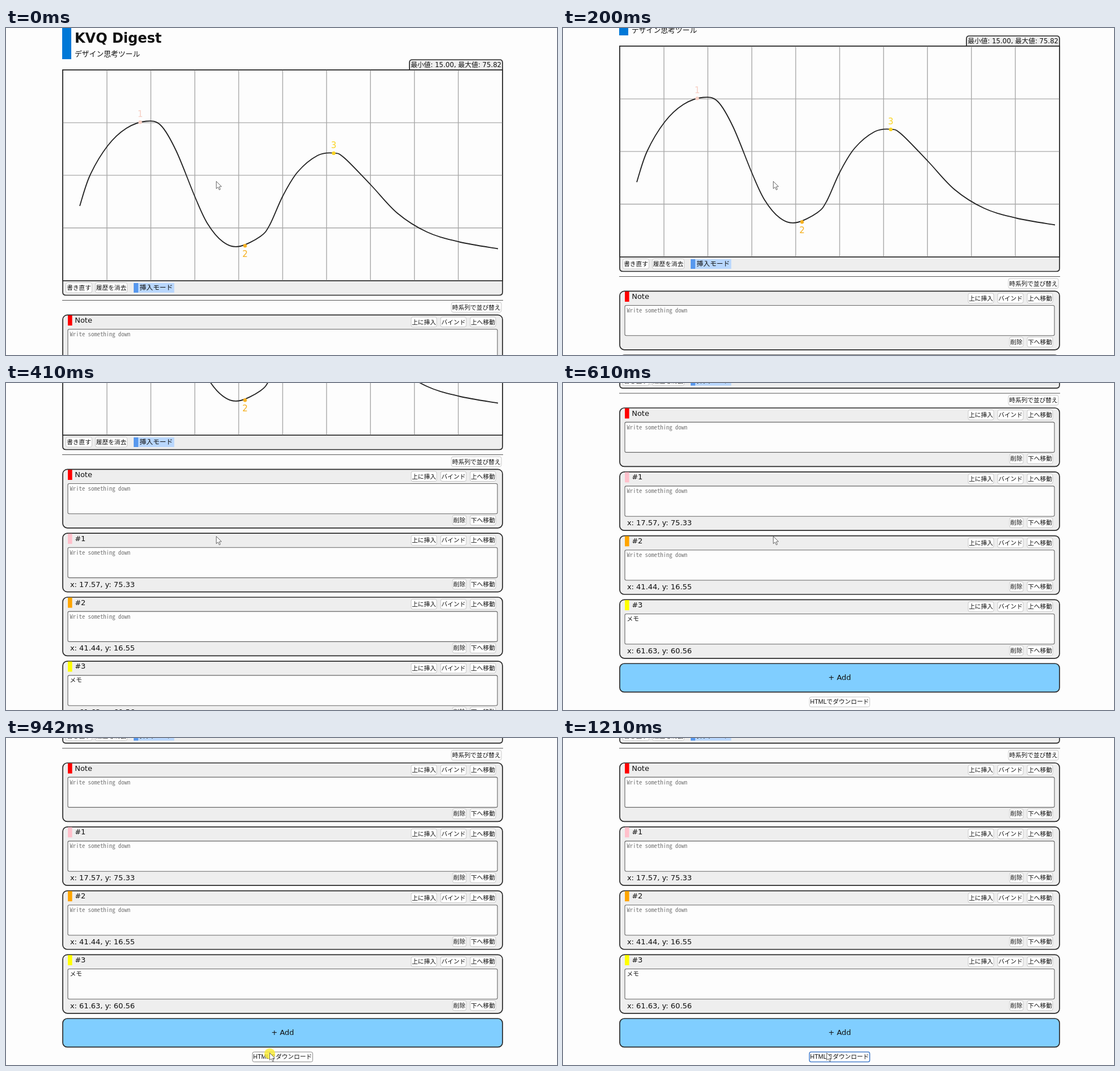
An HTML page that plays this animation: 971x577 px, repeating every 1.41 s.

```html
<!DOCTYPE html>
<html lang="ja">
<head>
<meta charset="utf-8">
<title>KVQ Digest</title>
<style>
html, body { margin: 0; width: 100%; height: 100%; overflow: hidden; background: #fdfdfd; }
svg { display: block; }
text { font: 13px "DejaVu Sans", "Noto Sans CJK JP", "Noto Sans CJK", sans-serif; fill: #111; white-space: pre; }
.h1 { font-size: 24px; font-weight: bold; }
.sub { font-size: 12.8px; }
.range { font-size: 11.7px; text-anchor: end; }
.mode { font-size: 11.7px; }
.mark text { font-size: 15px; text-anchor: middle; fill: inherit; }
.mid { text-anchor: middle; }
.btn text { font: 10.67px "Liberation Sans", "Noto Sans CJK JP", "Noto Sans CJK", sans-serif; text-anchor: middle; }
.btn rect { fill: #fefefe; stroke: #c8c8c8; }
.hint { font: 10.67px "Noto Sans Mono CJK JP", "Noto Sans Mono CJK", monospace; fill: #757575; }
.memo { font-size: 10.67px; }
.panel { fill: #eee; stroke: #2a2a2a; stroke-width: 1.7; }
.area { fill: #fdfdfd; stroke: #666; stroke-width: 1.1; }
.hover rect { stroke: #8a8a8a; }
.press rect, .focus rect { stroke: #4a80cc; stroke-width: 1.6; }
.press rect { fill: #cfcfcf; }
</style>
</head>
<body>
<svg width="971" height="577" viewBox="0 0 971 577">
  <g id="page"></g>
  <circle id="halo" cx="464.8" cy="557" r="9.6" fill="#fbec2c" opacity=".78"/>
  <path id="cursor" d="M0 0V12.8L3 10.2L5.2 15L7.2 14.1L5.1 9.5L9.2 9.2Z" fill="#fefefe" stroke="#555" stroke-width=".9"/>
</svg>
<script>
const $ = id => document.getElementById(id);
const rect = (x, y, w, h, attrs = '') => `<rect x="${x}" y="${y}" width="${w}" height="${h}" ${attrs}/>`;
const text = (x, y, str, cls = '') => `<text x="${x}" y="${y}" class="${cls}">${str}</text>`;
const button = (x, y, w, str, id = '') =>
  `<g class="btn" id="${id}">${rect(x, y, w, 17.5, 'rx="3"')}${text(x + w / 2, y + 12.5, str)}</g>`;

const notes = [
  { title: 'Note', tag: '#f00' },
  { title: '#1', tag: '#ffc0cb', ink: '#f6cfc4', x: 17.57, y: 75.33 },
  { title: '#2', tag: '#ffa500', ink: '#f5b020', x: 41.44, y: 16.55 },
  { title: '#3', tag: '#ff0', ink: '#f9d424', x: 61.63, y: 60.56, memo: 'メモ' }
];

// Key points of the drawn line
const curve = [
  [130, 314], [148, 260], [179, 208], [212, 177], [247, 164.5], [273, 172], [300, 217],
  [333, 298], [355, 345], [382, 377], [410, 385.5], [448, 368], [465, 347], [488, 296],
  [514, 254], [549, 225], [577, 220.6], [596, 229], [643, 277], [690, 327], [742, 360],
  [799, 377.5], [867, 389.5]
];

// Catmull-Rom spline through [x, y] points
function spline(pts) {
  let d = `M${pts[0]}`;
  for (let i = 0; i < pts.length - 1; i++) {
    const a = pts[i - 1] || pts[i], b = pts[i], c = pts[i + 1], e = pts[i + 2] || c;
    const c1 = b.map((v, k) => v + (c[k] - a[k]) / 6);
    const c2 = c.map((v, k) => v - (e[k] - b[k]) / 6);
    d += `C${c1} ${c2} ${c}`;
  }
  return d;
}

// Chart values run from 0 to 100 on both axes
function marker({ title, ink, x, y }) {
  const px = 100.5 + 7.74 * x, py = 445.6 - 3.71 * y;
  return `<g class="mark" fill="${ink}"><circle cx="${px}" cy="${py}" r="3.2"/>` +
    text(px, py + (y < 50 ? 20 : -9), title.slice(1)) + '</g>';
}

function chart() {
  let grid = '';
  for (let i = 1; i < 10; i++) grid += `M${100.5 + 77.4 * i} 74V446`;
  for (let i = 1; i < 4; i++) grid += `M100 ${74.3 + 92.8 * i}H875`;
  return '<path class="panel" d="M711 74V61Q711 56 716 56H870Q875 56 875 61V74"/>' +
    text(873, 69, '最小値: 15.00, 最大値: 75.82', 'range') +
    '<path class="panel" d="M100 74H875V466Q875 471.5 869.5 471.5H105.5Q100 471.5 100 466Z"/>' +
    rect(100, 74, 775, 372, 'class="panel" style="fill:#fdfdfd"') +
    `<path d="${grid}" stroke="#777" stroke-opacity=".62" stroke-width="1.4"/>` +
    `<path d="${spline(curve)}" fill="none" stroke="#222" stroke-width="1.8"/>` +
    notes.slice(1).map(marker).join('') +
    button(105.5, 449.5, 46, '書き直す') +
    button(157.5, 449.5, 56, '履歴を消去') +
    rect(225, 450, 8, 17, 'fill="#5798ee"') +
    rect(233, 450, 63.5, 17, 'fill="#b9d7fd"') +
    text(235.5, 462.2, '挿入モード', 'mode');
}

function card({ title, tag, x, y, memo }, i) {
  const top = 506 + 112.8 * i;
  return rect(100, top + .4, 775, 103.4, 'rx="8" class="panel"') +
    rect(109, top + 1, 7.6, 18, `fill="${tag}"`) +
    text(121.2, top + 14, title) +
    ['上に挿入', 'バインド', '上へ移動'].map((s, k) => button(714 + 52 * k, top + 4, 45, s)).join('') +
    rect(109, top + 25.5, 757, 53.3, 'rx="2.5" class="area"') +
    text(112.6, top + 38, memo || 'Write something down', memo ? 'memo' : 'hint') +
    (x ? text(112.9, top + 94.8, `x: ${x}, y: ${y}`) : '') +
    button(787, top + 81.3, 24, '削除') +
    button(818, top + 81.3, 45, '下へ移動');
}

$('page').innerHTML =
  rect(99, 0, 16, 55, 'fill="#0078d7"') +
  text(121, 26, 'KVQ Digest', 'h1') +
  text(121, 49.8, 'デザイン思考ツール', 'sub') +
  chart() +
  rect(99, 480, 777, 1, 'fill="#555"') +
  button(785, 484, 88, '時系列で並び替え') +
  notes.map(card).join('') +
  rect(100, 957.4, 775, 50.4, 'rx="8" class="panel" style="fill:#80ceff"') +
  text(487.5, 986.4, '+ Add', 'mid') +
  button(434.3, 1016.4, 106.2, 'HTMLでダウンロード', 'download');

// Each step keeps its scroll offset and button state until the next one
const steps = [
  { from: 0, scroll: 0 },
  { from: 200, scroll: 42 },
  { from: 410, scroll: 354 },
  { from: 610, scroll: 462.4 },
  { from: 810, scroll: 462.4, state: 'hover' },
  { from: 1030, scroll: 462.4, state: 'press' },
  { from: 1210, scroll: 462.4, state: 'focus' }
];

function draw() {
  const t = performance.now() % 1410;
  const { scroll, state = '' } = steps.filter(s => s.from <= t).pop();
  $('page').setAttribute('transform', `translate(0 ${-scroll})`);
  $('download').setAttribute('class', 'btn ' + state);
  $('halo').setAttribute('visibility', /hover|press/.test(state) ? 'visible' : 'hidden');
  $('cursor').setAttribute('transform', state ? 'translate(464.7 555.7)' : 'translate(370.6 270.6)');
  requestAnimationFrame(draw);
}
draw();
</script>
</body>
</html>
```
